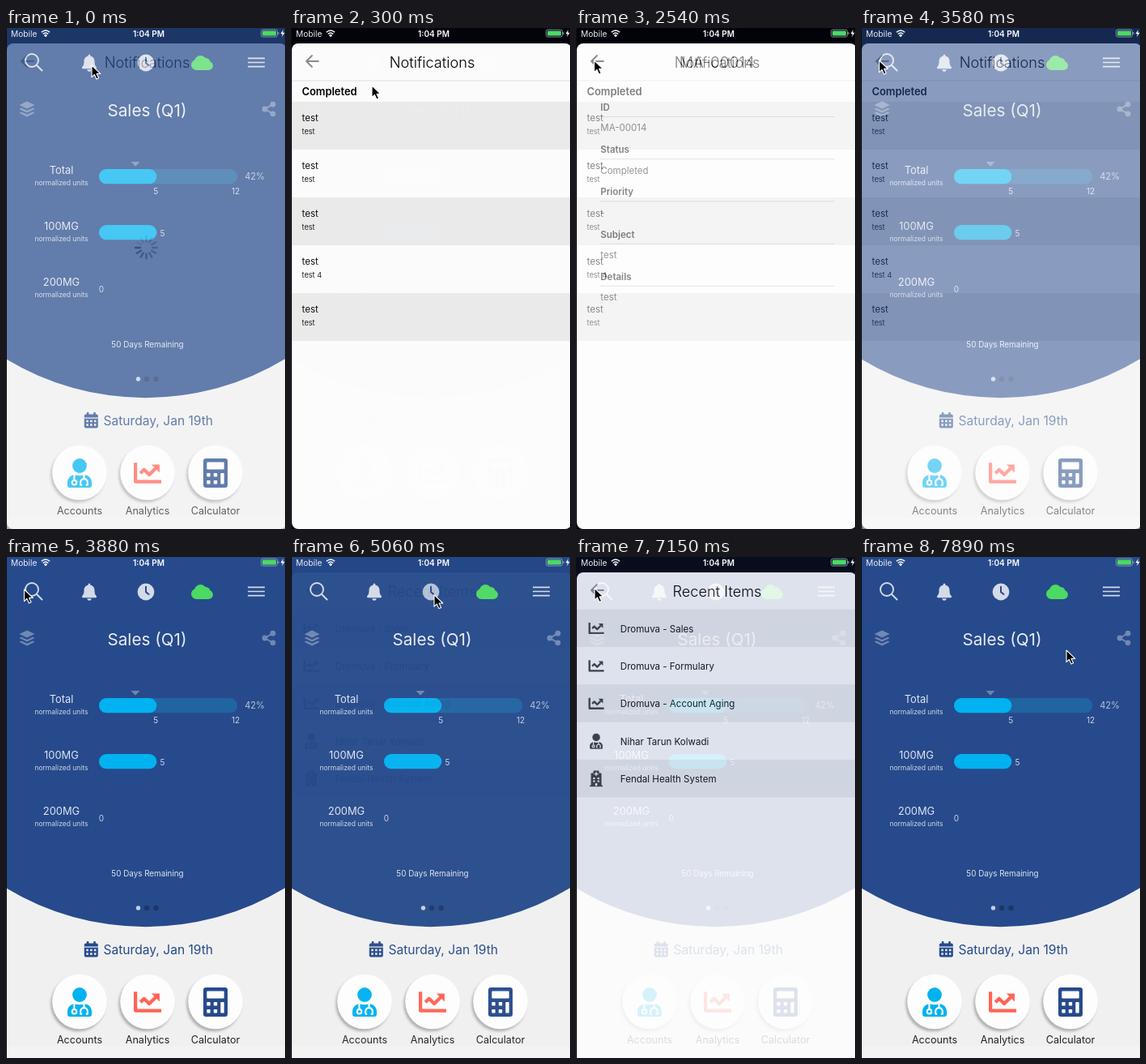
Recreate the animation shown at these times as an HTML page. Size 345 by 618 pixels, loop 8000 ms.

```html
<!DOCTYPE html>
<html lang="en">
<head>
<meta charset="utf-8">
<title>Sales app walkthrough</title>
<style>
  html, body { margin: 0; width: 100%; height: 100%; overflow: hidden; background: #000; }
  svg { display: block; width: 100vw; height: 100vh; }
  text { font-family: Inter, Roboto, "Liberation Sans", sans-serif; white-space: pre; }
  .disc { filter: drop-shadow(-1.5px 3px 1.5px rgba(0, 0, 0, .26)); }
</style>
</head>
<body>
<svg id="stage" viewBox="0 0 345 618" xmlns="http://www.w3.org/2000/svg"></svg>
<script>
const LOOP = 8000, TICK = 148.9;
const NAVY = '#264a8c', CYAN = '#00b2f0', CORAL = '#ff6355', INK = '#404044';

const text = (x, y, size, str, fill = '#000', anchor = 'start', weight = 400) =>
  `<text x="${x}" y="${y}" font-size="${size}" fill="${fill}" text-anchor="${anchor}" font-weight="${weight}">${str}</text>`;
const rect = (x, y, w, h, fill, r = 0) =>
  `<rect x="${x}" y="${y}" width="${w}" height="${h}" fill="${fill}" rx="${r}"/>`;
const circle = (x, y, r, fill) => `<circle cx="${x}" cy="${y}" r="${r}" fill="${fill}"/>`;
const fillPath = (d, fill) => `<path d="${d}" fill="${fill}"/>`;
const line = (d, color, w, cap = 'butt') =>
  `<path d="${d}" fill="none" stroke="${color}" stroke-width="${w}" stroke-linecap="${cap}" stroke-linejoin="round"/>`;
const place = (x, y, scale, body) => `<g transform="translate(${x} ${y}) scale(${scale})">${body}</g>`;
const group = (opacity, body) => `<g opacity="${opacity}">${body}</g>`;
const each = (items, fn) => items.map(fn).join('');

// Icons are drawn around their own centre.
const doctor = c =>
  circle(0, -9, 8.9, c) +
  fillPath('M-15 11.7C-15 6.5 -11 2.3 -6 2.2Q0 4.4 6 2.2C11 2.3 15 6.5 15 11.7V15Q15 18 12 18H-12Q-15 18 -15 15Z', c) +
  line('M-6.6 1.5V9M5.5 1.5V7M3.2 14.8H1.2V11.5C1.2 5.6 9.8 5.6 9.8 11.5V14.8H7.8', '#fff', 2.1) +
  circle(-6.5, 11.8, 3.8, '#fff') + circle(-6.5, 11.8, 1.7, c);

const chart = c =>
  line('M-14.9 -12.7V10.6H17', c, 4.2) +
  line('M-8.8 .3L-4.25 -4.25L2.1 2.1L10 -5.8', c, 4.2) +
  fillPath('M4.9 -10.6H14.9V-.6Z', c);

const calculator = c =>
  rect(-15, -18, 30, 36, c, 3.3) + rect(-10.7, -13.5, 21.4, 9, '#fff', 1) +
  each([-10.7, -2.2], x => each([0, 9], y => rect(x, y, 4.4, 4.5, '#fff', .8))) +
  rect(6.3, 0, 4.4, 13.5, '#fff', .8);

const hospital = c =>
  rect(-6.5, -7, 13, 16, c, 1) + rect(-3.5, -10, 7, 5, c, 1) + rect(-8, 8, 16, 1.6, c) +
  line('M0 -8.5V-3.5M-2.5 -6H2.5', '#fff', 1.2) +
  each([-3.8, 1.6], x => each([-1.5, 2], y => rect(x, y, 2.2, 2, '#fff'))) +
  rect(-1.2, 5.5, 2.4, 3, '#fff');

const calendar = c =>
  rect(-8.5, -7, 17, 17, c, 2) + rect(-5.5, -9.5, 2.6, 5, c, .8) + rect(2.9, -9.5, 2.6, 5, c, .8) +
  rect(-8.5, -3, 17, 1.2, '#f0f0f0') +
  each([-6, -1.2, 3.6], x => each([.2, 4.8], y => rect(x, y, 2.5, 2.5, '#f0f0f0')));

const bell = c =>
  fillPath('M0 -10.5Q1.4 -10.5 1.4 -8.6C5 -7.8 6.5 -5 6.5 -2C6.5 2.5 7.5 3.5 8.8 5Q9.8 7 8 7.2H-8Q-9.8 7 -8.8 5C-7.5 3.5 -6.5 2.5 -6.5 -2C-6.5 -5 -5 -7.8 -1.4 -8.6Q-1.4 -10.5 0 -10.5Z', c) +
  fillPath('M-2.8 8.3H2.8Q2.4 10.8 0 10.8Q-2.4 10.8 -2.8 8.3Z', c);

const layers = c =>
  fillPath('M0 -9.5L9.5 -5L0 -.5L-9.5 -5Z', c) +
  each([0, 4.8], y => fillPath(`M-7 ${y - 1.2}L0 ${y + 2}L7 ${y - 1.2}L9.5 ${y}L0 ${y + 4.6}L-9.5 ${y}Z`, c));

const share = c =>
  line('M5 -5.8L-5 0L5 5.8', c, 2) + circle(5, -5.8, 3.4, c) + circle(-5, 0, 3.4, c) + circle(5, 5.8, 3.4, c);

const clock = c => circle(0, 0, 10.4, c) + line('M0 -6.2V.3L3.5 3', NAVY, 2, 'round');

const cloud = c =>
  circle(235.5, 45.5, 6.5, c) + circle(240.5, 41.5, 7.5, c) + circle(247, 42.5, 5.5, c) +
  circle(250.3, 46.4, 5.6, c) + rect(235.5, 44, 15, 8, c);

function homePage() {
  const pale = '#d3dae8', soft = '#ccd6e7';
  const measures = [['Total', 180], ['100MG', 249], ['200MG', 318]];
  const apps = [[91, 'Accounts', doctor, CYAN], [175, 'Analytics', chart, CORAL], [259, 'Calculator', calculator, NAVY]];
  return rect(0, 0, 345, 618, '#f0f0f0') + rect(0, 603, 345, 15, '#f3f3f3') +
    fillPath('M0 0H345V408.2A334 334 0 0 1 0 408.2Z', NAVY) +
    `<circle cx="32" cy="40" r="8" fill="none" stroke="${pale}" stroke-width="1.9"/>` +
    line('M38 46L44.5 52.5', pale, 2, 'round') +
    place(103, 43, 1, bell(pale)) +
    `<g id="clock">${place(173, 43, 1, clock(pale))}</g>` +
    cloud('#4cd964') +
    line('M299 37.3H320M299 42.5H320M299 47.7H320', pale, 1.7) +
    group(.34, place(26, 100, 1, layers('#fff')) + place(325, 100, 1, share('#fff'))) +
    text(174.5, 108.8, 20.7, 'Sales (Q1)', '#e8ecf4', 'middle') +
    group(.32, fillPath('M154.5 165H165.5L160 170.8Z', '#fff')) +
    each(measures, ([name, y]) =>
      text(68.5, y, 12.9, name, '#dfe5ef', 'middle') +
      text(68.5, y + 14, 8.5, 'normalized units', soft, 'middle')) +
    rect(115, 174, 171.3, 18.3, '#2064a2', 9.1) + rect(115, 174, 71.3, 18.3, CYAN, 9.1) +
    rect(115, 243, 71.3, 18.3, CYAN, 9.1) +
    text(295.2, 187, 11.1, '42%', '#b5c2da') +
    text(185.3, 205, 10, '5', soft, 'middle') + text(284, 205, 10, '12', soft, 'middle') +
    text(190.5, 257, 10, '5', soft) + text(114.8, 325.5, 10, '0', soft) +
    text(175, 394, 9.85, '50 Days Remaining', '#dfe5ef', 'middle') +
    circle(163.5, 433, 2.7, '#c3cee2') + circle(174, 433, 3.2, '#1b3768') + circle(185.5, 433, 3.2, '#1b3768') +
    place(105.3, 483.5, 1, calendar(NAVY)) +
    text(120.5, 490, 15.6, 'Saturday, Jan 19th', NAVY) +
    each(apps, ([x, label, icon, color]) =>
      `<circle class="disc" cx="${x}" cy="548.5" r="33.8" fill="#fdfdfd"/>` +
      place(x, 549, 1, icon(color)) + text(x, 600, 12.6, label, '#222', 'middle'));
}

const page = (title, size, body, bottom = 618) =>
  rect(0, 0, 345, 618, '#02030a') + rect(1, 19, 346, bottom - 19, '#fdfdfd', 8) + body +
  line('M34.5 41H19M26.5 33.5L19 41L26.5 48.5', '#8b8b8b', 1.9) +
  text(174.5, 49, size, title, '#000', 'middle', 300);

function listPage() {
  const notes = ['test', 'test', 'test', 'test 4', 'test'];
  const rows = rect(1, 64.5, 344, 1, '#e2e2e2') + text(13.5, 82.5, 12.9, 'Completed', '#000', 'start', 600) +
    each(notes, (note, i) => {
      const y = 91 + 59 * i;
      return (i % 2 ? '' : rect(1, y, 344, 59, '#ececec')) +
        text(13.5, y + 24, 11.6, 'test', '#111') + text(13.5, y + 40, 9.2, note, '#222');
    });
  const spokes = each([...Array(12).keys()], i =>
    `<path d="M0 -7.5V-13.5" stroke="#000" stroke-width="2.3" stroke-linecap="round" opacity="${.12 + .045 * ((i + 2) % 12)}" transform="rotate(${30 * i})"/>`);
  return page('Notifications', 18.2, `<g id="rows">${rows}</g><g id="spinner">${place(173.5, 271, 1, spokes)}</g>`);
}

function detailPage() {
  const fields = [['ID', 'MA-00014'], ['Status', 'Completed'], ['Priority', '-'], ['Subject', 'test'], ['Details', 'test']];
  return page('MA-00014', 19.2, each(fields, ([name, value], i) => {
    const y = 102 + 52.2 * i;
    return text(30.3, y, 11.5, name, '#111', 'start', 600) +
      rect(30, y + 7, 290, 1, '#cfcfcf') + text(30.3, y + 25.3, 11.5, value, '#333');
  }));
}

function recentPage() {
  const items = [
    ['Dromuva - Sales', chart, .56], ['Dromuva - Formulary', chart, .56], ['Dromuva - Account Aging', chart, .56],
    ['Nihar Tarun Kolwadi', doctor, .53], ['Fendal Health System', hospital, 1]
  ];
  return page('Recent Items', 18.2, each(items, ([name, icon, scale], i) => {
    const y = 64.5 + 46.4 * i;
    return (i % 2 ? '' : rect(1, y, 344, 46.4, '#ededf0')) +
      place(25, y + 23.5, scale, icon(INK)) + text(54.8, y + 28, 11.55, name, '#111');
  }), 630);
}

const statusBar = () =>
  text(6, 10.5, 10.2, 'Mobile', '#e8ebf2') +
  line('M43.8 5.3Q49 .6 54.2 5.3M45.7 7.5Q49 4.6 52.3 7.5', '#fff', 1.5) + fillPath('M46.9 9L49 7.4L51.1 9L49 11.3Z', '#fff') +
  text(176.5, 10.5, 10, '1:04 PM', '#fff', 'middle', 600) +
  `<rect x="315.5" y="2" width="20" height="9" rx="2.2" fill="none" stroke="#8f9bb3" stroke-width=".9"/>` +
  rect(317, 3.4, 17, 6.2, '#4cd964', 1) + rect(336.3, 5, 1.2, 3, '#8f9bb3', .6) +
  fillPath('M342.8 2L339.6 7.2H342L341 11.2L344.6 5.8H342.2Z', '#fff');

const ARROW = 'M0 0V14.6L3.4 11.4L5.9 17L8.6 15.8L6.1 10.4H10.8Z';
const pointer = fillPath(ARROW, '#000') + line(ARROW, '#fff', 1.1);

const stage = document.getElementById('stage');
stage.innerHTML = `<g>${homePage()}</g><g id="list">${listPage()}</g><g id="detail">${detailPage()}</g>` +
  `<g id="recent">${recentPage()}</g>${statusBar()}${rect(0, 0, 1, 618, '#0c0d12')}<g id="cursor">${pointer}</g>`;
const ids = ['list', 'detail', 'recent', 'clock', 'rows', 'spinner', 'cursor'];
const parts = Object.fromEntries(ids.map(id => [id, document.getElementById(id)]));

// Each key: tick, then the values reached at that tick.
const fades = {
  list: [[0, .28], [1, .78], [2, .992], [3, 1], [22, 1], [23, .88], [24, .46], [25, .08], [26, 0]],
  detail: [[7, 0], [8, .06], [9, .55], [10, .97], [11, 1], [16, 1], [17, .5], [18, .08], [19, 0]],
  recent: [[33, 0], [34, .03], [35, .6], [36, .994], [47, .994], [48, .85], [49, .4], [50, .06], [51, 0]],
  clock: [[32, 1], [33, .6], [34, .82], [35, 1]]
};
const cursorPath = [
  [0, 106, 46], [2, 100, 71], [5, 88, 108], [11, 88, 108], [14, 22.5, 40], [27, 22.5, 40], [28, 28, 44], [29, 28, 44],
  [33, 177, 46.5], [38, 177, 47], [42, 23, 38.5], [49, 23, 38.5], [53, 254, 115]
];

function at(keys, n) {
  const i = keys.findIndex(k => k[0] >= n);
  if (i < 0) return keys[keys.length - 1].slice(1);
  if (i === 0) return keys[0].slice(1);
  const a = keys[i - 1], b = keys[i], p = (n - a[0]) / (b[0] - a[0]);
  return a.slice(1).map((v, j) => v + (b[j + 1] - v) * p);
}

const show = (node, on) => node.setAttribute('display', on ? 'inline' : 'none');

function draw(ms) {
  const n = Math.min(53, Math.floor((ms % LOOP + 5) / TICK));
  for (const id in fades) {
    const [opacity] = at(fades[id], n);
    parts[id].setAttribute('opacity', opacity);
    show(parts[id], opacity > 0);
  }
  show(parts.spinner, n < 1);
  show(parts.rows, n >= 1);
  parts.cursor.setAttribute('transform', `translate(${at(cursorPath, n)})`);
}

const start = performance.now();
function loop() {
  draw(performance.now() - start);
  requestAnimationFrame(loop);
}
loop();
</script>
</body>
</html>
```
